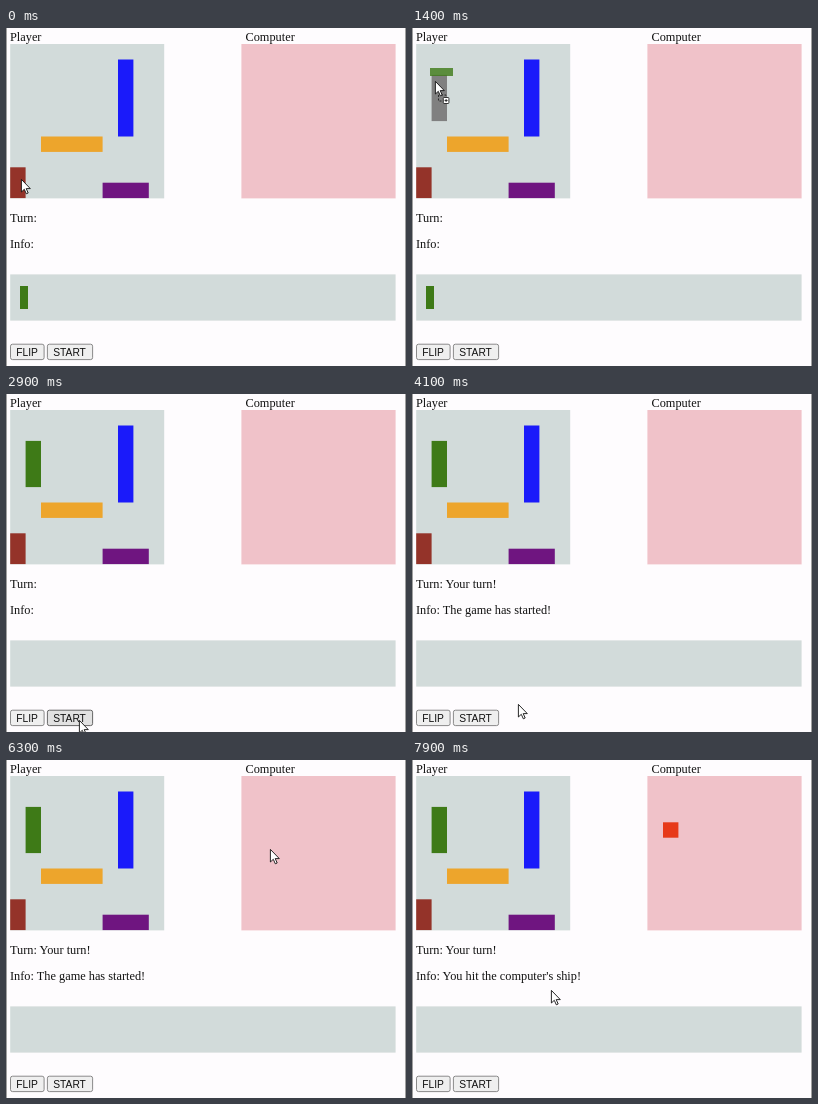
Animation, 400 px wide and 338 px high, one loop 8000 ms. Source, as an HTML page:

```html
<!DOCTYPE html>
<html lang="en">
<head>
<meta charset="utf-8">
<title>Ship game</title>
<style>
  html, body { margin: 0; width: 100%; height: 100%; overflow: hidden; background: #fefcfe; }
  svg { display: block; width: 400px; height: 338px; }
  text { font: 12.32px "Liberation Serif", "Times New Roman", serif; fill: #111; white-space: pre; }
  .button text { font: 10.27px "Liberation Sans", Arial, sans-serif; }
  .button rect { fill: #efefef; stroke: #767676; stroke-width: .85; }
  .button.hover rect { fill: #e2e2e2; stroke: #4f4f4f; }
  .button.active rect { fill: #f5f5f5; stroke: #8d8d8d; }
</style>
</head>
<body>
<svg viewBox="0 0 400 338">
  <path d="M.5 0V338M399.5 0V338" stroke="#a0a0a0"/>
  <text x="4" y="13">Player</text>
  <text x="239.5" y="13">Computer</text>
  <g fill="#d2dbda">
    <rect x="4.2" y="16" width="154" height="154.4"/>
    <rect x="4.2" y="246.4" width="385.4" height="46.2"/>
  </g>
  <rect x="235.4" y="16" width="154.2" height="154.4" fill="#f0c2c9"/>
  <g id="ships"></g>
  <rect id="docked" x="14" y="258" width="8" height="23" fill="#3e7a17"/>
  <text id="turn" x="4" y="194"></text>
  <text id="info" x="4" y="220"></text>
  <g class="button">
    <rect x="4.5" y="316.2" width="33.6" height="15.4" rx="2"/>
    <text x="10.2" y="327.5">FLIP</text>
  </g>
  <g class="button" id="start">
    <rect x="41.4" y="316.2" width="45.2" height="15.4" rx="2"/>
    <text x="47.2" y="327.5">START</text>
  </g>
  <g id="cursor">
    <rect id="ghost" x="-5" y="-13" width="23" height="8" fill="#3e7a17" opacity=".8"/>
    <g id="badge" fill="none" stroke="#222" stroke-width=".9">
      <path d="M3.5 14V20H8M6 14H11V16" stroke-dasharray="2 1.5"/>
      <rect x="8.3" y="16.5" width="5.6" height="6" rx=".8" fill="#fff"/>
      <path d="M9.6 19.5H12.6M11.1 18V21"/>
    </g>
    <path d="M.4 .4V13L3.3 10.3 5.3 14.8 7.2 14 5.2 9.6H9.3Z" fill="#fff" stroke="#111" stroke-width=".9"/>
  </g>
</svg>
<script>
const CELL = 15.4, LOOP = 8000, STEP = 100;
const PLAYER = 4.2, COMPUTER = 235.6, TOP = 16.1;
const GRAB = 500, DROP = 1600, PRESS = 3200, RELEASE = 3700, HIT = 6700;
const $ = id => document.getElementById(id);

function addShip(left, col, row, cols, rows, color) {
  const ship = document.createElementNS("http://www.w3.org/2000/svg", "rect");
  const attrs = { x: left + col * CELL, y: TOP + row * CELL, width: cols * CELL, height: rows * CELL, fill: color };
  for (const name in attrs) ship.setAttribute(name, attrs[name]);
  return $("ships").appendChild(ship);
}

addShip(PLAYER, 7, 1, 1, 5, "#1a1afa");
addShip(PLAYER, 2, 6, 4, 1, "#eda52c");
addShip(PLAYER, 0, 8, 1, 2, "#943329");
addShip(PLAYER, 6, 9, 3, 1, "#6f1580");
const preview = addShip(PLAYER, 1, 2, 1, 3, "#808080");
const placed = addShip(PLAYER, 1, 2, 1, 3, "#3e7a17");
const hit = addShip(COMPUTER, 1, 3, 1, 1, "#e73a1a");

// Cursor stops: time, x, y
const path = [
  [0, 15, 151], [300, 19, 271], [500, 19, 271], [900, 21, 160], [1300, 23, 56],
  [1400, 23, 53], [1700, 23, 53], [2400, 66, 325], [2900, 73, 326], [3600, 73, 326],
  [4100, 106, 310], [5100, 106, 310], [5500, 216, 160], [6000, 303, 41],
  [6300, 264, 89], [6600, 259, 76], [7000, 259, 76], [7900, 139, 230], [LOOP, 139, 230]
];

function cursorAt(t) {
  const i = path.findIndex(stop => stop[0] > t);
  const [t0, x0, y0] = path[i - 1], [t1, x1, y1] = path[i];
  const k = (t - t0) / (t1 - t0);
  return [x0 + (x1 - x0) * k, y0 + (y1 - y0) * k];
}

const show = (element, on) => element.setAttribute("visibility", on ? "visible" : "hidden");

function draw(now) {
  const t = Math.floor(now % LOOP / STEP) * STEP;
  const [x, y] = cursorAt(t);
  const dragging = t >= GRAB && t < DROP;
  const row = Math.floor((y - TOP) / CELL);
  const overBoard = dragging && row < 10;

  $("cursor").setAttribute("transform", `translate(${x} ${y})`);
  show($("ghost"), dragging);
  show($("badge"), overBoard);
  preview.setAttribute("y", TOP + row * CELL);
  show(preview, overBoard && row < 8);
  show(placed, t >= DROP);
  show($("docked"), t < DROP);
  show(hit, t >= HIT);

  const hover = x > 41 && x < 87 && y > 316 && y < 332;
  const pressed = t >= PRESS && t < RELEASE;
  $("start").setAttribute("class", "button" + (pressed ? " active" : hover ? " hover" : ""));

  const started = t >= RELEASE;
  $("turn").textContent = "Turn:" + (started ? " Your turn!" : "");
  $("info").textContent = "Info:" + (t >= HIT ? " You hit the computer's ship!" : started ? " The game has started!" : "");
  requestAnimationFrame(() => draw(performance.now()));
}
draw(0);
</script>
</body>
</html>
```
